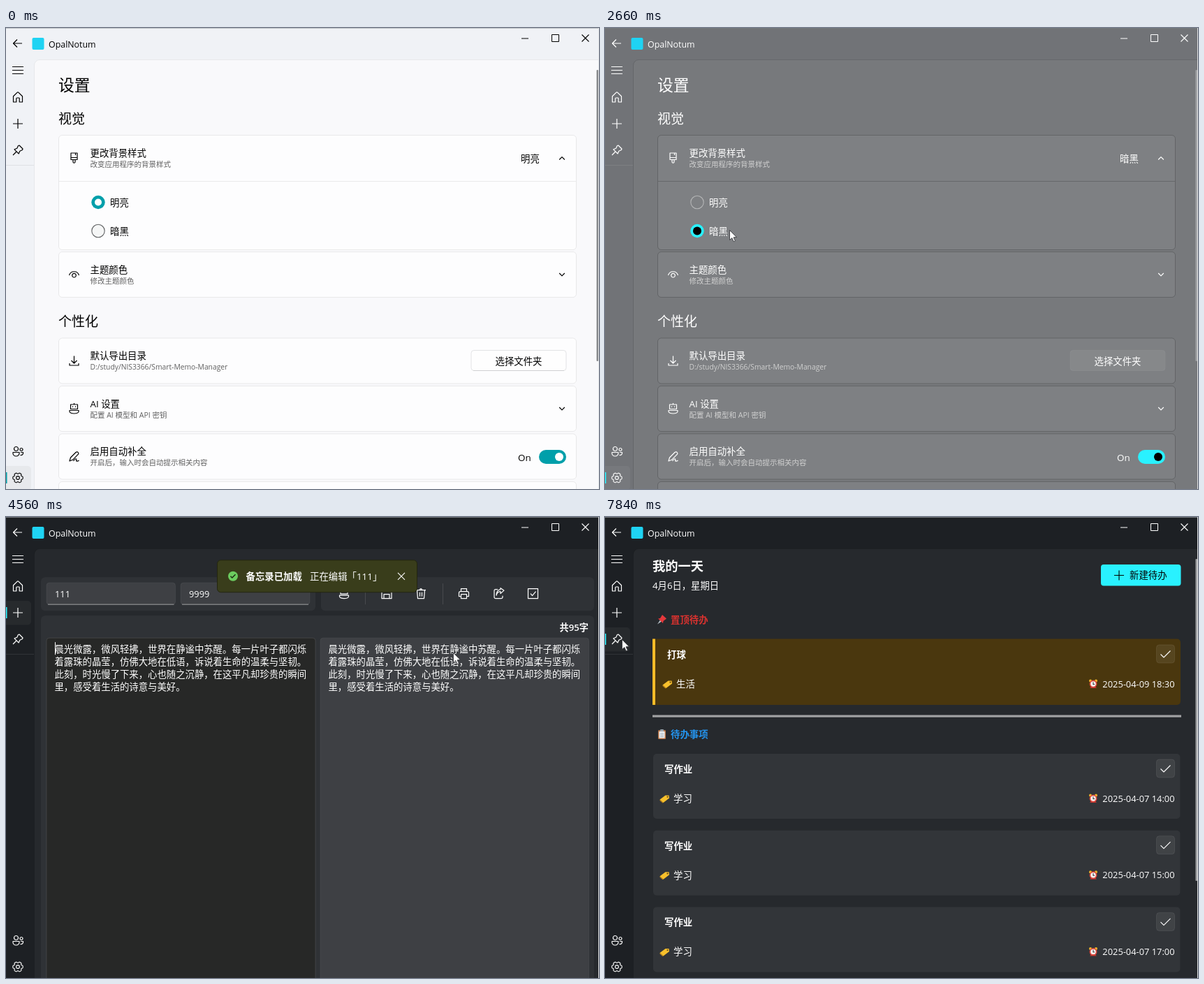
An HTML page with a canvas for the animation above (8 s loop, 849 by 660 pixels).

```html
<!DOCTYPE html>
<html lang="zh-CN">
<head>
<meta charset="utf-8">
<title>备忘录</title>
<style>
html, body { margin: 0; width: 100%; height: 100%; overflow: hidden; background: #1d2125; }
canvas { display: block; }
</style>
</head>
<body>
<canvas id="stage" width="849" height="660"></canvas>
<script>
const ctx = document.getElementById('stage').getContext('2d');
const FONT = '"Open Sans", "Noto Sans CJK SC", "Noto Sans CJK", sans-serif';
const HEAD_FONT = '"Liberation Sans", sans-serif';
const LOOP = 8000;
const MEMO = [
  '晨光微露，微风轻拂，世界在静谧中苏醒。每一片叶子都闪烁',
  '着露珠的晶莹，仿佛大地在低语，诉说着生命的温柔与坚韧。',
  '此刻，时光慢了下来，心也随之沉静，在这平凡却珍贵的瞬间',
  '里，感受着生活的诗意与美好。'
];

// Times of the main events, in ms
const AT = { radio: 2240, dark: 2585, home: 3220, edit: 4450, toast: 4500, close: 5900, back: 7017, todo: 7480 };

const POINTER = [
  [130, 789, 618], [530, 789, 618], [600, 780, 617], [870, 780, 617], [1010, 602, 250],
  [1270, 602, 250], [1600, 400, 225], [2030, 178, 289], [2990, 178, 289], [3200, 20, 98],
  [3600, 20, 98], [3820, 640, 194], [5360, 640, 194], [5500, 625, 114.5], [5640, 600, 112],
  [5780, 600, 112], [5880, 566, 92], [6260, 566, 92], [6400, 545, 82], [6600, 545, 82],
  [6990, 6, 92], [7370, 6, 92], [7470, 24, 175], [8000, 24, 175]
];

const ICON = {
  back: 'M6.5,0H-6M-.5,-5.5L-6,0L-.5,5.5',
  menu: 'M-8,-5.5H8M-8,-.5H8M-8,4.5H8',
  home: 'M-6.5,-1.2L-1,-6.6Q0,-7.5 1,-6.6L6.5,-1.2V7H2.2V2Q2.2,1 1.2,1H-1.2Q-2.2,1 -2.2,2V7H-6.5Z',
  plus: 'M-7,0H7M0,-7V7',
  pin: 'M2,-7L7,-2L6.5,-.5L2.8,1.2L1.2,5L-5,-1.2L-1.2,-2.8L.5,-6.5ZM-2,2L-7,7',
  people: 'M-5.5,-3.5a3,3 0 1 0 6,0a3,3 0 1 0 -6,0M3,-2.5a2,2 0 1 0 4,0a2,2 0 1 0 -4,0M-7,1.5H2V3A4.5,4 0 0 1 -7,3ZM4,1.5H7.5V3Q7,6 3.5,5.5',
  brush: 'M-4.5,-7H4.5V2.5H-4.5ZM-4.5,-.5H4.5M-1.5,2.5V6Q0,8.5 1.5,6V2.5M2,-7V-4',
  eye: 'M-7,1C-5,-6 5,-6 7,1M-2.8,1.2a2.8,2.8 0 1 0 5.6,0a2.8,2.8 0 1 0 -5.6,0',
  load: 'M0,-7V3.5M-4,-.5L0,3.5L4,-.5M-6.5,3.5V6.5H6.5V3.5',
  robot: 'M-5,-6H5V.5H-5ZM-2,-3.5V-2M2,-3.5V-2M0,-6V-8M-6.5,2.5H6.5V4C6.5,8 -6.5,8 -6.5,4Z',
  pen: 'M-6.5,6.5L-5,1.5L2.5,-6Q4.5,-7.5 6,-5.5Q7,-4 5.5,-2.8L-2,4.8ZM-1,6.5C2,2 4,2.5 3,6Q4.5,7.5 7,5.5',
  up: 'M-3.8,2L0,-1.8L3.8,2',
  down: 'M-3.8,-2L0,1.8L3.8,-2',
  min: 'M-5,.5H5',
  max: 'M-5,-5H5V5H-5Z',
  cross: 'M-5,-5L5,5M5,-5L-5,5',
  find: 'M-4,-1a3.2,3.2 0 1 0 6.4,0a3.2,3.2 0 1 0 -6.4,0M1.4,1.4L4.5,4.5',
  sort: 'M-4,6V-6M-7.5,-2.5L-4,-6L-.5,-2.5M4,-6V6M.5,2.5L4,6L7.5,2.5',
  sync: 'M-7,-1A7,7 0 0 1 6,-3.6M7,-7.5V-3.5H3M7,1A7,7 0 0 1 -6,3.6M-7,7.5V3.5H-3',
  save: 'M-7,-7H4L7,-4V7H-7ZM-4,-7V-3H3V-7M-4,7V1H4V7',
  bin: 'M-7,-5H7M-2,-5Q0,-9 2,-5M-5.5,-5L-4.5,7H4.5L5.5,-5M-1.5,-2V4M1.5,-2V4',
  print: 'M-4,-3V-7H4V-3M-4,4H-7V-1Q-7,-3 -5,-3H5Q7,-3 7,-1V4H4M-4,1H4V7H-4Z',
  share: 'M-1,-6H-4Q-6,-6 -6,-4V5Q-6,7 -4,7H4Q6,7 6,5V3M-3,3Q-2,-3 3,-3V0L8,-4.5L3,-8V-6Q-3,-5 -3,3',
  box: 'M-7,-7H7V7H-7ZM-3.5,0L-1,3L4,-3',
  tick: 'M-7,0L-2.5,4.5L7,-5'
};
for (const k in ICON) ICON[k] = new Path2D(ICON[k]);

const clamp = u => Math.max(0, Math.min(1, u));
const mix = (a, b, u) => a + (b - a) * u;
const outQuad = u => 1 - (1 - u) * (1 - u);
const ease = (t, start, span) => outQuad(clamp((t - start) / span));
const white = a => `rgba(255,255,255,${a})`;
const black = a => `rgba(0,0,0,${a})`;
let dark, ink, soft, accent, face, edge;

function text(s, x, y, size, color = ink, weight = 400, align = 'left', family = FONT) {
  ctx.font = `${weight} ${size}px ${family}`;
  ctx.textAlign = align;
  ctx.fillStyle = color;
  ctx.fillText(s, x, y + size * 0.37);
}

function rect(x, y, w, h, fill, stroke, r = 5) {
  ctx.beginPath();
  ctx.roundRect(x, y, w, h, r);
  if (fill) { ctx.fillStyle = fill; ctx.fill(); }
  if (stroke) { ctx.strokeStyle = stroke; ctx.lineWidth = 1; ctx.stroke(); }
}

function bar(x, y, w, h, fill) {
  ctx.fillStyle = fill;
  ctx.fillRect(x, y, w, h);
}

function disc(x, y, r, fill, stroke) {
  ctx.beginPath();
  ctx.arc(x, y, r, 0, 7);
  if (fill) { ctx.fillStyle = fill; ctx.fill(); }
  if (stroke) { ctx.strokeStyle = stroke; ctx.lineWidth = 1.1; ctx.stroke(); }
}

function icon(name, x, y, color = ink, width = 1.2) {
  ctx.save();
  ctx.translate(x, y);
  ctx.strokeStyle = color;
  ctx.lineWidth = width;
  ctx.lineJoin = 'round';
  ctx.stroke(ICON[name]);
  ctx.restore();
}

function gear(x, y) {
  ctx.beginPath();
  for (let i = 0; i <= 96; i++) {
    const a = i / 96 * Math.PI * 2;
    const r = 6.3 + 0.9 * Math.tanh(2 * Math.cos(a * 6) + 1);
    ctx.lineTo(x + r * Math.cos(a), y + r * Math.sin(a));
  }
  ctx.strokeStyle = ink;
  ctx.lineWidth = 1.1;
  ctx.stroke();
  disc(x, y, 2.4, null, ink);
}

function poly(points, fill) {
  ctx.beginPath();
  points.forEach(p => ctx.lineTo(...p));
  ctx.closePath();
  ctx.fillStyle = fill;
  ctx.fill();
}

function frame(selected) {
  bar(0, 0, 849, 1, dark ? '#73787c' : '#c0c4c8');
  bar(848, 0, 1, 660, dark ? '#dcdddf' : '#e4e6e9');
  icon('back', 16.5, 22);
  rect(37.5, 14, 17, 17, '#1fd3f3', null, 2);
  text('OpalNotum', 61, 23, 12.4);
  icon('min', 743, 14.5, ink, 1);
  icon('max', 786.5, 14.5, ink, 1);
  icon('cross', 829.5, 14.5, ink, 1.1);

  rect(-5, selected - 17, 41, 34.5, dark ? white(0.045) : black(0.04));
  bar(0, selected - 8, 1.5, 16, accent);
  icon('menu', 17, 61);
  icon('home', 17, 99);
  icon('plus', 17, 137);
  icon('pin', 17, 175);
  bar(0, 196, 40, 1, dark ? white(0.09) : black(0.07));
  icon('people', 17, 606);
  gear(17, 644);
}

function scrollbar(h) {
  rect(845.5, 60, 2.5, h, dark ? '#a3a5a7' : '#888a8c', null, 1);
}

function radio(y, on, hover, label) {
  if (on) {
    disc(132, y, 9.7, accent);
    disc(132, y, hover ? 6 : 5, dark ? '#000' : '#fff');
  } else {
    disc(132, y, 9.2, dark ? null : '#f5f6f6', dark ? '#b4b5b6' : '#606264');
  }
  text(label, 149, y + 1, 13.4);
}

function setting(y, h, glyph, title, note, noteSize = 10.5) {
  rect(75.5, y + 0.5, 741, h, face, edge);
  icon(glyph, 97.5, y + 33);
  text(title, 120.5, y + 26, 13.4);
  text(note, 120.5, y + 42, noteSize, soft);
}

function settings(t) {
  text('设置', 75, 82, 22.8);
  text('视觉', 75, 130, 19);
  setting(153, 164, 'brush', '更改背景样式', '改变应用程序的背景样式');
  bar(76, 219, 740, 1, edge);
  text(dark ? '暗黑' : '明亮', 737, 187, 13.4);
  icon('up', 796, 186.5);
  const picked = t >= AT.radio;
  radio(249.5, !picked, t > 940 && t < 1800, '明亮');
  radio(290.5, picked, true, '暗黑');
  setting(320, 65, 'eye', '主题颜色', '修改主题颜色');
  icon('down', 796, 353);
  text('个性化', 75, 420, 19);
  setting(443.5, 65, 'load', '默认导出目录', 'D:/study/NIS3366/Smart-Memo-Manager', 10.3);
  rect(666, 461.5, 136, 29, dark ? white(0.06) : '#fefefe', dark ? white(0.05) : '#e2e3e5', 4);
  if (!dark) bar(669, 490, 130, 1, '#cfd0d2');
  text('选择文件夹', 734, 477, 13.4, ink, 400, 'center');
  setting(512, 65, 'robot', 'AI 设置', '配置 AI 模型和 API 密钥');
  icon('down', 796, 545);
  setting(580.5, 65, 'pen', '启用自动补全', '开启后，输入时会自动提示相关内容');
  text('On', 733, 615, 13.4);
  rect(763, 604, 39, 20, accent, null, 10);
  disc(792, 614, 6, dark ? '#000' : '#fff');
  rect(75.5, 649.5, 741, 65, face, edge);
  scrollbar(417);
}

function field(x, y, w, h) {
  rect(x, y, w, h, white(0.07), white(0.06), 4);
  bar(x + 2, y + h - 0.5, w - 4, 1, '#9b9c9e');
}

function home(stamp, t) {
  rect(50, 56, 708, 48, white(0.04), null, 6);
  field(58.5, 64.5, 554.5, 31);
  icon('find', 595, 80, '#d0d0d0', 1.1);
  rect(619.5, 64.5, 130, 30, white(0.055), white(0.03), 4);
  bar(720, 65, 1, 30, white(0.07));
  icon('sort', 639, 79.5);
  text('排序方式', 654, 79.5, 13.4);
  icon('down', 735, 80, '#c8c8c8', 1.1);
  for (const x of [766, 808]) rect(x, 64.5, 35, 30, white(0.075), white(0.03), 4);
  icon('plus', 783.5, 79.5);
  icon('sync', 825.5, 79.5);

  rect(50, 112, 792, 545, white(0.053), null, 6);
  const hover = t > 3800 && t < AT.edit;
  rect(68, 130.5, 756, 89, white(hover ? 0.07 : 0.045));
  text('111', 96, 153, 17.6, ink, 700, 'left', HEAD_FONT);
  text('晨光微露，微风轻拂，世界在静谧中苏醒。每...', 96.5, 179, 13.37);
  text(stamp, 96.5, 202, 11);
  for (const x of [785, 791, 797]) disc(x, 175, 1.5, ink);
}

function editor(t) {
  rect(50, 56, 393, 48, white(0.045), null, 6);
  rect(451, 56, 391, 48, white(0.045), null, 6);
  field(58, 64, 184.5, 31);
  field(250, 64, 185, 31);
  text('111', 70, 80, 12.8);
  text('9999', 262, 80, 12.8);
  icon('robot', 484, 79.5);
  icon('save', 545, 79.5);
  icon('bin', 594, 79.5);
  icon('print', 655.5, 79.5);
  icon('share', 705, 79.5);
  icon('box', 754.5, 79.5);
  for (const x of [514, 625]) bar(x, 65, 1, 30, white(0.12));

  rect(50, 111, 792, 546, white(0.045), null, 6);
  text('共95字', 834, 128, 13.2, ink, 600, 'right');
  rect(58, 143, 385, 507, '#272827', white(0.1), 4);
  bar(59, 647.5, 383.5, 2.5, accent);
  field(450, 143, 384.5, 507);
  MEMO.forEach((line, i) => {
    text(line, 69.5, 159 + i * 18.1, 13.37);
    text(line, 461.5, 159 + i * 18.1, 13.37);
  });
  if (t >= 4560 && Math.floor((t - 4560) / 530) % 2 === 0) bar(70, 149, 1, 18, '#fff');
}

function toast(t) {
  if (t < AT.toast || t > AT.close + 200) return;
  ctx.save();
  ctx.globalAlpha = 1 - clamp((t - AT.close) / 200);
  ctx.translate(0, -16 * (1 - ease(t, AT.toast, 200)));
  rect(302.5, 69.5, 286, 46, '#393d1b', '#23260f', 5);
  disc(325, 92.5, 7, '#6ccb5f');
  ctx.save();
  ctx.translate(325, 92.5);
  ctx.scale(0.5, 0.5);
  icon('tick', 0, 0, '#1c2410', 2.8);
  ctx.restore();
  text('备忘录已加载', 343.5, 93, 13.4, ink, 700);
  text('正在编辑「111」', 435, 93, 13.4);
  icon('cross', 566, 92.5, ink, 1.1);
  ctx.restore();
}

function tag(x, y) {
  poly([[x - 7, y + 1], [x + 1, y - 5], [x + 6, y - 5], [x + 6.5, y - 1], [x - 2, y + 5.5]], '#f7c02c');
  poly([[x - 7, y + 1], [x - 2, y + 5.5], [x - 3, y + 6], [x - 7, y + 2.5]], '#c98a15');
  disc(x + 4, y - 2.8, 1.1, '#6b4a1c');
}

function alarm(x, y) {
  disc(x - 4, y - 4.5, 2, '#f0b429');
  disc(x + 4, y - 4.5, 2, '#f0b429');
  poly([[x - 5, y + 6], [x, y], [x + 5, y + 6]], '#b8342e');
  disc(x, y, 5.4, '#e04a3f');
  disc(x, y, 3.7, '#f6f4f2');
  bar(x - 0.5, y - 2.7, 1, 3.2, '#333');
  bar(x - 0.5, y, 2.6, 1, '#333');
}

function task(y, inset, title, kind, due) {
  text(title, 85 + inset, y + 22, 13.4, ink, 700);
  rect(789.5, y + 8, 26, 26, white(0.07), white(0.08), 4);
  icon('tick', 802.5, y + 21.5, ink, 1.1);
  tag(85.5 + inset, y + 64.5);
  text(kind, 98 + inset, y + 64, 13.4);
  alarm(699, y + 64);
  text(due, 815.5, y + 64, 12.85, ink, 400, 'right');
}

function todo() {
  text('我的一天', 68, 70, 18.3, ink, 700);
  text('4月6日，星期日', 68, 98, 13.3);
  rect(710, 68, 114.5, 30.5, accent, null, 4);
  icon('plus', 736, 83.5, '#000', 1.1);
  text('新建待办', 751, 83.5, 13.4, '#000');

  poly([[75, 153.5], [79, 147.5], [81, 149.5]], '#b9c4cc');
  poly([[76, 145.5], [79, 145], [82, 140], [88, 145.5], [83.5, 149], [83, 152]], '#e5383b');
  text('置顶待办', 94, 147, 13.4, '#d8322f', 700);
  rect(68, 174.5, 756, 94.5, '#4a370e', null, [0, 5, 5, 0]);
  bar(68, 174.5, 4, 94.5, '#fcbc28');
  task(175, 4, '打球', '生活', '2025-04-09 18:30');
  bar(68, 283.5, 757, 3.2, '#a1a2a3');

  rect(76, 305, 11, 13, '#b9774a', null, 1.5);
  rect(77.5, 307, 8, 9.5, '#eef1f4', null, 0);
  rect(79, 304, 5, 3, '#9aa5ae', null, 1);
  for (let i = 0; i < 3; i++) bar(79, 309.5 + i * 2.2, 5, 0.8, '#8fa0ae');
  text('待办事项', 94, 311, 13.4, '#2494ee', 700);
  ['14', '15', '17', '19'].forEach((hour, i) => {
    const y = 339 + i * 109.7;
    rect(69, y, 754.5, 93, white(0.055));
    task(y, 0, '写作业', '学习', `2025-04-07 ${hour}:00`);
  });
  scrollbar(461);
}

function pointer(t) {
  if (t < POINTER[0][0]) return;
  const i = Math.max(1, POINTER.findIndex(p => p[0] > t));
  const [t0, x0, y0] = POINTER[i - 1], [t1, x1, y1] = POINTER[i];
  const u = clamp((t - t0) / (t1 - t0)), s = u * u * (3 - 2 * u);
  ctx.save();
  ctx.translate(mix(x0, x1, s), mix(y0, y1, s));
  poly([[0.5, 0.5], [0.5, 14.5], [3.8, 11.6], [6.2, 16.8], [8.4, 15.8], [6, 10.8], [10.4, 10.6]], '#fff');
  ctx.strokeStyle = '#3a3c40';
  ctx.lineWidth = 0.9;
  ctx.stroke();
  ctx.restore();
}

const PAGES = [
  { at: 0, nav: 644, draw: settings },
  { at: AT.home, nav: 99, draw: t => home('2025-04-06 17:22:30', t) },
  { at: AT.edit, nav: 137, draw: editor },
  { at: AT.back, nav: 99, draw: t => home('2025-04-06 17:45:34', t) },
  { at: AT.todo, nav: 175, draw: todo }
];

function setTheme(t) {
  dark = t >= AT.dark;
  ink = dark ? '#fff' : '#000';
  soft = dark ? '#d0d0d0' : '#606060';
  accent = dark ? '#29f1ff' : '#009faa';
  face = dark ? white(0.05) : white(0.72);
  edge = dark ? black(0.19) : black(0.075);
}

function paint(t) {
  setTheme(t);
  const fade = ease(t, AT.dark, 205);
  const base = [[240, 29], [242, 32], [246, 36]].map(([a, b]) => Math.round(mix(a, b, fade)));
  bar(0, 0, 849, 660, `rgb(${base})`);
  rect(40.5, 45.5, 820, 640, dark ? white(0.04) : white(0.6), dark ? black(0.12) : black(0.055), 8);

  const page = PAGES.findLast(p => t >= p.at);
  ctx.save();
  ctx.beginPath();
  ctx.rect(41, 46, 808, 614);
  ctx.clip();
  if (page.at) ctx.translate(0, 76 * (1 - ease(t, page.at, 300)));
  page.draw(t);
  ctx.restore();

  frame(page.nav);
  toast(t);
  pointer(t);
}

function loop(now) {
  paint(now % LOOP);
  requestAnimationFrame(loop);
}
paint(0);
requestAnimationFrame(loop);
</script>
</body>
</html>
```
